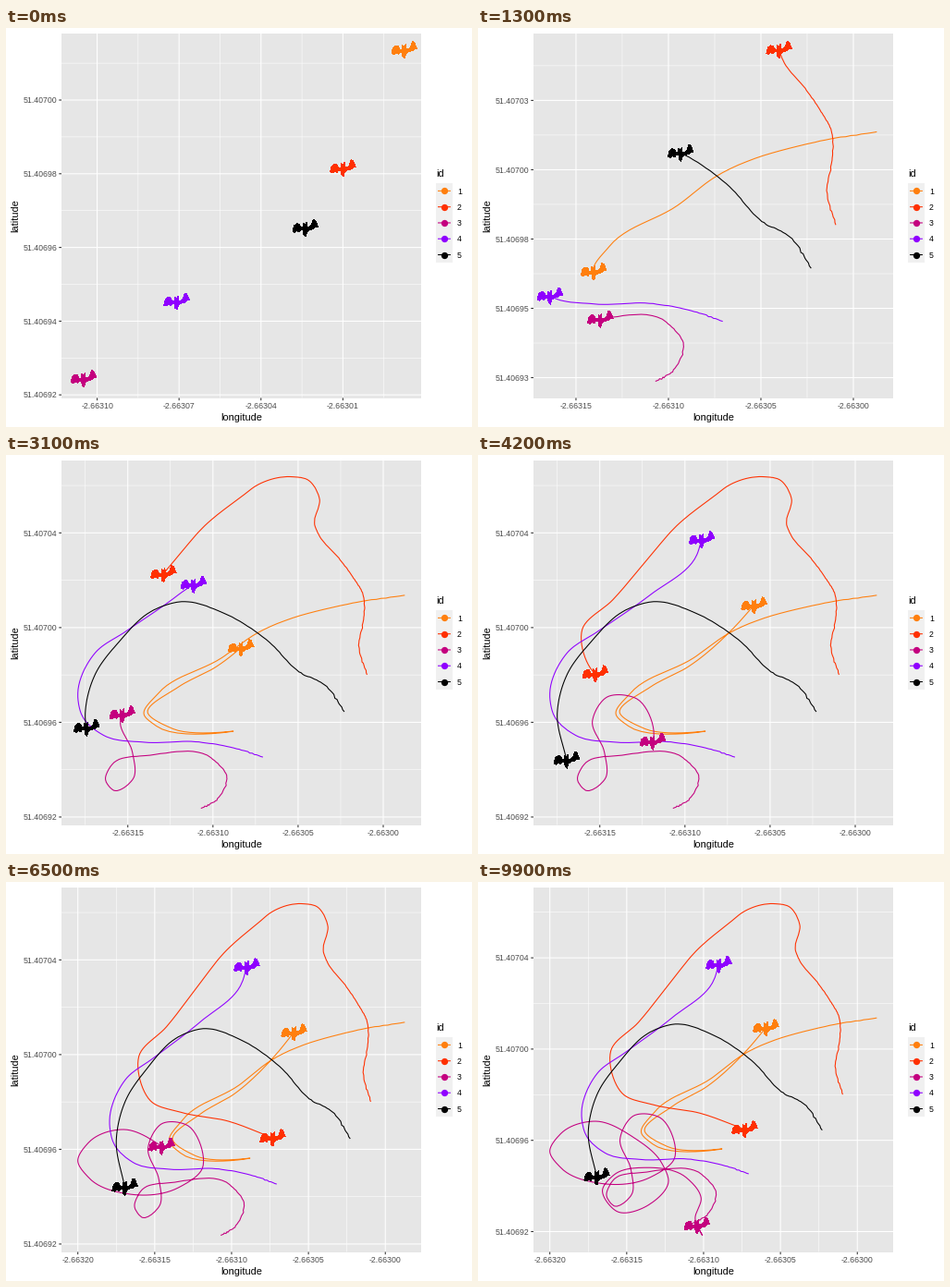
Recreate the animation shown at these times as a matplotlib script. Size 504x432 px, loop 10 s.

```python
import math

import numpy as np
import matplotlib.pyplot as plt
from matplotlib.animation import FuncAnimation
from matplotlib.patches import Polygon, Rectangle

W, H, FRAMES = 504, 432, 100
LEFT, RIGHT, TOP, BOTTOM = 60, 449, 5.5, 400.5
FONT = "Liberation Sans"

# Key points of each flight, in legs: (arrival frame, points along the leg).
ORANGE = [
    (13, [(431.3, 152), (370, 161.5), (270, 194), (233, 220), (165, 258),
          (149.5, 281)]),
    (21, [(163, 293.5), (246, 299), (181, 296.5)]),
    (33, [(153.5, 279), (187, 251), (228, 229), (277, 187)]),
    (35.3, [(298.5, 163)]),
]
RED = [
    (13, [(390.5, 238), (382, 209), (387, 176), (386, 151), (375, 132),
          (360, 112), (338, 86), (334, 76)]),
    (21, [(339, 47), (326, 27), (311, 24), (270, 34), (258, 43)]),
    (42, [(215, 77), (182, 115), (146, 157), (113, 189), (127, 237)]),
    (54.5, [(164, 249.5), (220, 259), (273, 277)]),
]
MAGENTA = [
    (13, [(211, 382.4), (228, 373.5), (239, 349), (222, 328), (156, 325)]),
    (21, [(115, 335), (108, 352), (117, 363)]),
    (42, [(138, 350), (137, 322), (124, 288), (140, 262), (172, 264),
          (189, 310)]),
    (65, [(160, 331), (103, 338), (53, 320), (40, 302), (53, 282), (95, 268),
          (140, 286)]),
    (87, [(174, 315), (182, 335), (158, 362), (120, 369), (103, 345),
          (117, 328), (156, 320)]),
    (99, [(203, 331), (221, 354), (214, 378), (222.5, 396), (216, 385)]),
]
PURPLE = [
    (13, [(278, 327), (250, 318), (205, 310.5), (150, 311), (106, 303.5)]),
    (21, [(83, 283), (78, 262), (97, 214)]),
    (36, [(130, 191), (186, 152), (237, 108), (242, 92)]),
]
BLACK = [
    (13, [(366, 278), (345, 249), (317, 235), (285, 203), (236, 171.5)]),
    (21, [(190, 159), (160, 168), (122, 203)]),
    (34.5, [(97, 237), (86, 280), (96, 330)]),
]

BAT = np.array([
    (-13.5, 4), (-12, -2), (-9, -4.5), (-6.5, -4), (-5, -.5), (-2, -.3),
    (-2, -5), (0, -3), (1.8, -6), (2, -1), (5, -1), (7, -3), (9, -9),
    (11, -8), (14, -1), (11, -1), (9, 1), (5, 2), (2, 4), (.6, 9), (-1.5, 7),
    (-2, 2.5), (-5, 2.5), (-6, 4.5), (-9, 3), (-11, 5)])


class Flight:
    """Smooth, slightly shaky path, travelled at steady speed per leg."""

    def __init__(self, color, legs, lead, shake, steps=12):
        self.color = color
        pts = np.array([p for _, leg in legs for p in leg], float)
        t = np.r_[0, np.cumsum(np.hypot(*np.diff(pts, axis=0).T))]
        slope = np.gradient(pts, t, axis=0)
        u = np.linspace(0, 1, steps, endpoint=False)[None, :, None]
        dt = np.diff(t)[:, None, None]
        p0, p1 = pts[:-1, None], pts[1:, None]
        m0, m1 = slope[:-1, None] * dt, slope[1:, None] * dt
        curve = ((2*u**3 - 3*u**2 + 1) * p0 + (u**3 - 2*u**2 + u) * m0
                 + (3*u**2 - 2*u**3) * p1 + (u**3 - u**2) * m1)
        xy = np.vstack([curve.reshape(-1, 2), pts[-1]])
        self.s = np.r_[0, np.cumsum(np.hypot(*np.diff(xy, axis=0).T))]
        noise = np.random.default_rng(5).normal(size=xy.shape)
        noise[0] = 0
        xy += noise * shake * np.exp(-self.s / 90)[:, None]
        # units of 1e-5 degree
        self.xy = np.c_[-266315 + (xy[:, 0] - 132) / 18.4,
                        5140700 + (187 - xy[:, 1]) / 25.6]
        ends = np.cumsum([len(leg) for _, leg in legs]) - 1
        self.frames = [0] + [f for f, _ in legs]
        self.dist = [lead] + list(self.s[ends * steps])

    def until(self, k):
        d = np.interp(k, self.frames, self.dist)
        here = [np.interp(d, self.s, c) for c in self.xy.T]
        return np.vstack([self.xy[self.s < d], here])


FLIGHTS = [
    Flight("#ff7f0e", ORANGE, .5, .2),
    Flight("#ff3000", RED, 4, .5),
    Flight("#c4007f", MAGENTA, 4, .5),
    Flight("#8f00ff", PURPLE, .5, .3),
    Flight("#000000", BLACK, 3, .6),
]


def nice_breaks(lo, hi, m=5):
    """Extended Wilkinson labelling: best scoring (first multiple, step)."""
    best, found = -1e9, None
    span = hi - lo
    for i, q in enumerate([1, 5, 2, 2.5, 4, 3]):
        for k in range(2, 11):
            z0 = math.ceil(math.log10(span / (k + 1) / q))
            for z in (z0, z0 + 1):
                step = q * 10.0**z
                width = step * (k - 1)
                first = math.floor(hi / step) - (k - 1)
                last = math.ceil(lo / step)
                for n in range(min(first, last) - 1, max(first, last) + 2):
                    a, b = n * step, n * step + width
                    cover = 1 - .5 * ((hi - b)**2 + (lo - a)**2) / (.1 * span)**2
                    r = (k - 1) / width
                    rt = (m - 1) / (max(b, hi) - min(a, lo))
                    dens = 2 - max(r / rt, rt / r)
                    score = -.25 * i / 5 + .2 * cover + .5 * dens
                    if score > best + 1e-9:
                        best, found = score, (n, step)
    return found


def labels(values, digits):
    texts = [f"{v / 1e5 + 1e-10:.{digits}f}" for v in values]
    while all(t.endswith("0") for t in texts):
        texts = [t[:-1] for t in texts]
    return texts


def axis(lo, hi, a, b):
    """Pixel mapping plus major and minor ticks for one data range."""
    pad = .05 * (hi - lo)
    lo, hi = lo - pad, hi + pad

    def px(v):
        return a + (v - lo) / (hi - lo) * (b - a)

    n, step = nice_breaks(lo, hi)
    ticks = [i * step for i in range(n - 2, n + 12) if lo <= i * step <= hi]
    minor = [t + step / 2 for t in [ticks[0] - step] + ticks]
    return px, ticks, [t for t in minor if lo <= t <= hi]


fig = plt.figure(figsize=(W / 72, H / 72), dpi=72, facecolor="white")
ax = fig.add_axes([0, 0, 1, 1])


def text(x, y, s, size=8.8, color="black", **kw):
    ax.text(x, y, s, fontsize=size, color=color, family=FONT, **kw)


def line(x, y, color, lw=1.07, z=2):
    ax.plot(x, y, color=color, lw=lw, zorder=z, snap=False,
            solid_capstyle="butt", solid_joinstyle="round")


def box(x, y, w, h, color):
    ax.add_patch(Rectangle((x, y), w, h, fc=color, lw=0, zorder=0))


def legend():
    text(465, 161, "id", 11)
    for i, flight in enumerate(FLIGHTS):
        y = 176.4 + 17.28 * i
        box(465.3, y - 8.64, 17.28, 17.28, "#f0f0f0")
        line([467, 480.9], [y, y], flight.color)
        ax.plot(474, y, "o", ms=7.3, mew=0, color=flight.color, zorder=3)
        text(488, y + 3.2, str(i + 1))


def draw(k):
    ax.clear()
    ax.set(xlim=(0, W), ylim=(H, 0))
    ax.axis("off")
    box(LEFT, TOP, RIGHT - LEFT, BOTTOM - TOP, "#e6e6e6")

    trails = [f.until(k) for f in FLIGHTS]
    seen = np.vstack(trails)
    (x0, y0), (x1, y1) = seen.min(axis=0), seen.max(axis=0)
    px, xt, xm = axis(x0, x1, LEFT, RIGHT)
    py, yt, ym = axis(y0, y1, BOTTOM, TOP)

    for xs, ys, lw in ((xm, ym, .53), (xt, yt, 1.07)):
        for v in xs:
            line([px(v)] * 2, [TOP, BOTTOM], "white", lw, 1)
        for v in ys:
            line([LEFT, RIGHT], [py(v)] * 2, "white", lw, 1)

    for v, s in zip(xt, labels(xt, 6)):
        line([px(v)] * 2, [BOTTOM, BOTTOM + 2.75], "#333333")
        text(px(v), 412, s, color="#4d4d4d", ha="center")
    for v, s in zip(yt, labels(yt, 5)):
        line([LEFT - 2.75, LEFT], [py(v)] * 2, "#333333")
        text(55.1, py(v) + 3.2, s, color="#4d4d4d", ha="right")
    text((LEFT + RIGHT) / 2, 425, "longitude", 11, ha="center")
    text(13.4, (TOP + BOTTOM) / 2, "latitude", 11, ha="center",
         rotation=90, rotation_mode="anchor")

    for trail, flight in zip(trails, FLIGHTS):
        x, y = px(trail[:, 0]), py(trail[:, 1])
        line(x, y, flight.color, z=4)
        ax.add_patch(Polygon(BAT + (x[-1], y[-1]), fc=flight.color, lw=0,
                             antialiased=False, zorder=5))
    legend()
    return []


anim = FuncAnimation(fig, draw, frames=FRAMES, interval=100,
                     init_func=lambda: [], repeat=True, repeat_delay=0)
plt.show()
```
